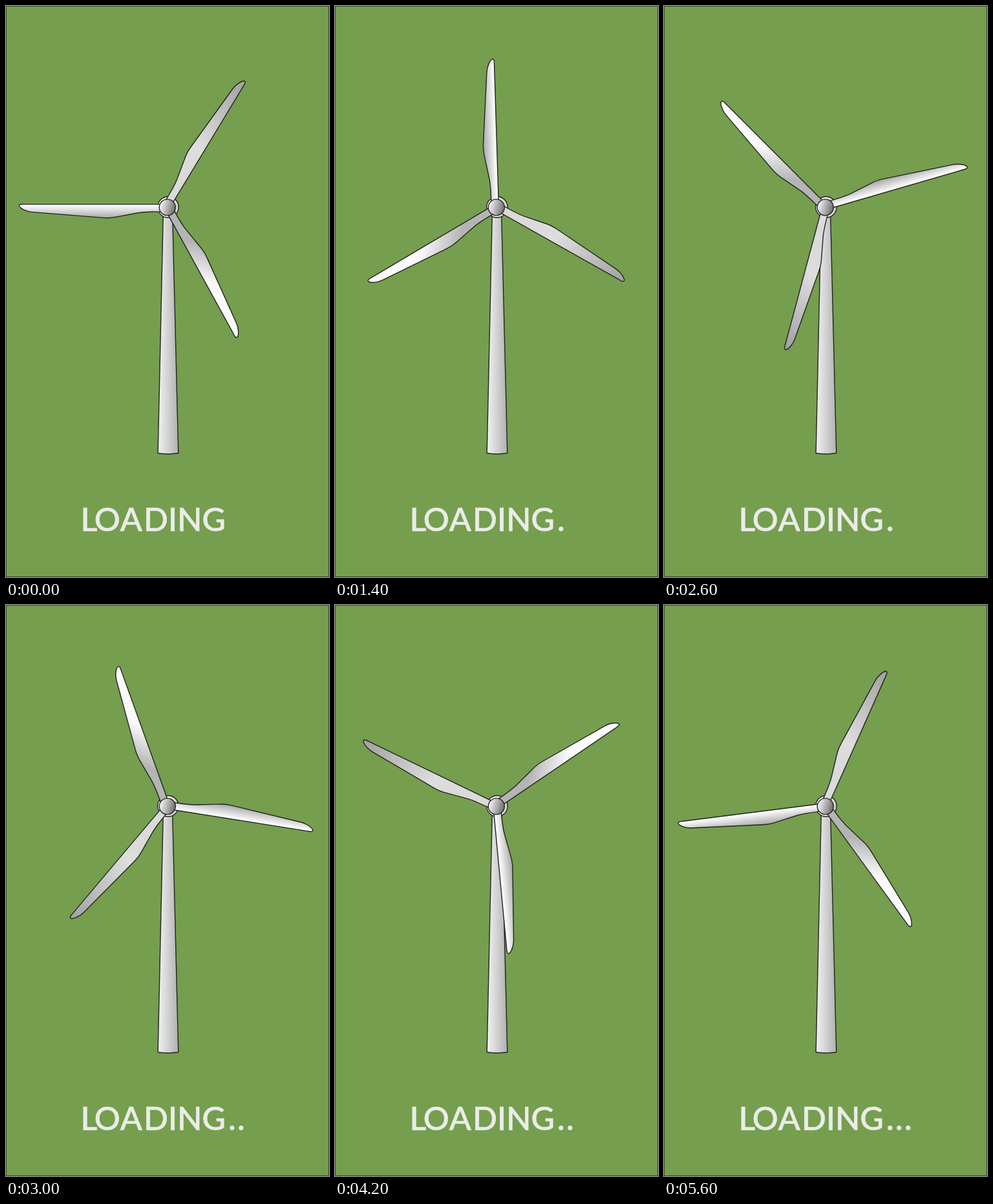
An HTML page for the animation above (5700 ms loop, 500 by 883 pixels).

```html
<!DOCTYPE html>
<html lang="en">
<head>
<meta charset="utf-8">
<title>Loading</title>
<style>
  html, body { margin: 0; height: 100%; overflow: hidden; background: #759e4e; }
  svg { display: block; width: 100vw; height: 100vh; }
  text { font: 500 50px Lato, "Open Sans", sans-serif; fill: #eaece8; stroke: #eaece8; stroke-width: .7; }
  #dots { letter-spacing: 2.2px; }
  .line { stroke: #22241f; stroke-width: 1.4; stroke-linejoin: round; }
</style>
</head>
<body>
<svg viewBox="0 0 500 883" preserveAspectRatio="none">
  <defs>
    <linearGradient id="mast">
      <stop stop-color="#f2f2f2"/><stop offset="1" stop-color="#b0b0b0"/>
    </linearGradient>
    <linearGradient id="ball" x2="1" y2=".25">
      <stop offset=".05" stop-color="#fff"/><stop offset="1" stop-color="#777"/>
    </linearGradient>
    <linearGradient id="collar">
      <stop offset=".3" stop-color="#fff"/><stop offset="1" stop-color="#ccc"/>
    </linearGradient>
    <!-- blade shading, for a blade pointing left -->
    <linearGradient id="across" gradientUnits="userSpaceOnUse" x1="150" y1="307" x2="150" y2="328">
      <stop offset=".1" stop-color="#fafafa"/><stop offset="1" stop-color="#a6a6a6"/>
    </linearGradient>
    <linearGradient id="darkTip" gradientUnits="userSpaceOnUse" x1="20" y1="306" x2="170" y2="345">
      <stop stop-color="#a0a0a0"/><stop offset=".8" stop-color="#dedede"/><stop offset="1" stop-color="#dadada"/>
    </linearGradient>
    <linearGradient id="lightTip" gradientUnits="userSpaceOnUse" x1="125" y1="300" x2="165" y2="338">
      <stop stop-color="#fafafa"/><stop offset="1" stop-color="#b4b4b4"/>
    </linearGradient>
    <path id="blade" d="M242 306.6H27C22 306.2 20 307.5 20.5 309.5C22 313 31 317.8 40 318.6L150 327.4
      C158 328.2 166 327.4 174 325.6L205 319.8C216 318 228 318 242 318Z"/>
  </defs>

  <rect x=".5" y=".5" width="499" height="882" fill="#759e4e" stroke="#3a4d28"/>
  <path class="line" fill="url(#mast)" d="M243.5 315H257.5L266.8 691.5Q251 694 235.2 691.5Z"/>
  <circle class="line" fill="url(#collar)" cx="251" cy="311" r="16.2"/>
  <g id="rotor" class="line">
    <use href="#blade" fill="url(#across)"/>
    <use href="#blade" fill="url(#darkTip)" transform="rotate(121.2 249.2 310.9)"/>
    <use href="#blade" fill="url(#lightTip)" transform="rotate(241.2 249.2 310.9)"/>
  </g>
  <circle class="line" fill="url(#ball)" cx="249.8" cy="311.4" r="12.5"/>
  <text x="115.5" y="812" dx="0 -3 1 2">LOADING</text>
  <text id="dots" x="344" y="812"></text>
</svg>
<script>
  const STEPS = 57, STEP_MS = 100, STEP_DEG = 6.3;
  const rotor = document.getElementById('rotor');
  const dots = document.getElementById('dots');
  const start = performance.now();

  function draw(now) {
    const step = Math.floor(Math.max(0, now - start) / STEP_MS) % STEPS;
    rotor.setAttribute('transform', `rotate(${step * STEP_DEG} 249.2 310.9)`);
    dots.textContent = '.'.repeat((step * 4 + 2) / STEPS);
    requestAnimationFrame(draw);
  }
  draw(start);
</script>
</body>
</html>
```
